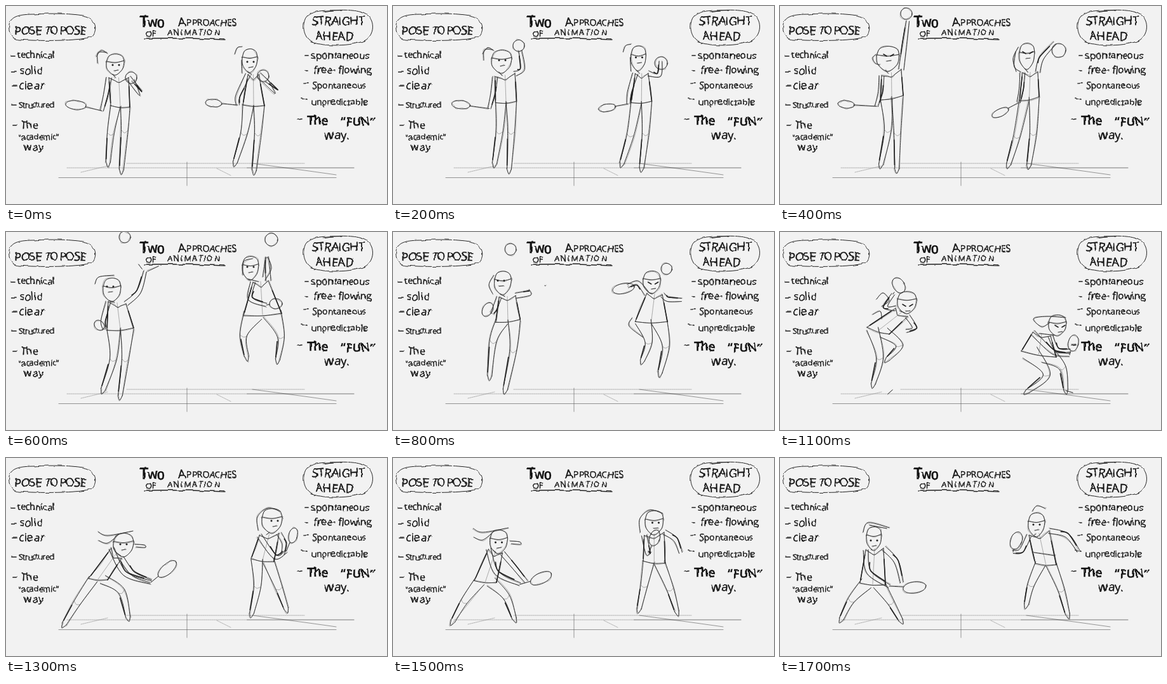
An HTML page for the animation above (1800 ms loop, 600 px wide and 312 px high).

```html
<!DOCTYPE html>
<html lang="en">
<head>
<meta charset="utf-8">
<title>Two approaches of animation</title>
<style>
  html, body { margin: 0; width: 100%; height: 100%; overflow: hidden; background: #f2f2f2; }
  svg { display: block; width: 600px; height: 312px; }
  path { fill: none; stroke: #222; stroke-linecap: round; stroke-linejoin: round; }
  text { font-family: "Open Sans", "Noto Sans", sans-serif; fill: #111; stroke: #111; stroke-width: .35; stroke-linejoin: round; }
  .strong { font-weight: 600; }
  #bold { stroke-width: 1.6; }
  #line { stroke-width: 1; stroke: #333; }
  #faint { stroke-width: .6; stroke: #777; }
</style>
</head>
<body>
<svg viewBox="0 0 600 312">
  <filter id="wobble" x="0" y="0" width="600" height="312" filterUnits="userSpaceOnUse" color-interpolation-filters="sRGB">
    <feTurbulence type="fractalNoise" baseFrequency=".07" numOctaves="2" seed="4"/>
    <feDisplacementMap in="SourceGraphic" scale="4" xChannelSelector="R" yChannelSelector="G"/>
  </filter>
  <g stroke-width=".6">
    <path style="stroke:#888" stroke-dasharray="2 1" d="M96 255H380M190 248H470M118 262L160 252M332 256L354 267"/>
    <path style="stroke:#555" d="M83 270.5H520M285 246V283M388 248L470 259L520 266"/>
    <path d="M380 255H548"/>
  </g>
  <g id="lettering" filter="url(#wobble)">
    <path d="M45 13C75 11 115 12 128 17C143 23 144 40 135 48C120 56 45 55 20 53C4 50 3 35 6 26C10 16 22 13 45 13"/>
    <path d="M530 7C500 6 482 8 474 16C466 25 466 48 482 57C500 64 545 64 566 54C580 45 581 25 570 15C560 6 530 4 500 9"/>
    <path stroke-width="1.4" d="M218 51Q280 50 344 53"/>
    <path stroke-width="1.7" d="M8 78h7M9 103h7M9 126h7M9 156h7M12 188h5M471 78h5M471 102h5M470 122h6M464 145l10 2M460 178l6-1"/>
    <text x="13" y="45" font-size="18.5" letter-spacing="-1">POSE</text>
    <text x="61" y="44" font-size="17" letter-spacing="-1">TO</text>
    <text x="84" y="45" font-size="18" letter-spacing="-1">POSE</text>
    <text x="210" y="33" font-size="25" class="strong">T</text>
    <text x="223" y="33" font-size="20" letter-spacing="-1.5" class="strong">wo</text>
    <text x="271" y="33" font-size="20">A</text>
    <text x="284" y="31" font-size="14">PPROACHES</text>
    <text x="220" y="48" font-size="12.5">OF</text>
    <text x="254" y="46" font-size="12.5" letter-spacing="1.8">ANIMATION</text>
    <text x="481" y="30" font-size="19" letter-spacing="-.6">STRAIGHT</text>
    <text x="487" y="54" font-size="18.5">AHEAD</text>
    <text x="18" y="82" font-size="14.5" letter-spacing="-.2">technical</text>
    <text x="22" y="107" font-size="16">solid</text>
    <text x="20" y="131" font-size="17" letter-spacing=".6">clear</text>
    <text x="20" y="160" font-size="12" letter-spacing="-.4">Structured</text>
    <text x="23" y="193" font-size="16">The</text>
    <text x="20" y="211" font-size="12.5">“academic”</text>
    <text x="29" y="228" font-size="15" letter-spacing="1">way</text>
    <text x="481" y="83" font-size="15">spontaneous</text>
    <text x="485" y="106" font-size="15.6">free- flowing</text>
    <text x="482" y="130" font-size="14">Spontaneous</text>
    <text x="481" y="156" font-size="13.7">unpredictable</text>
    <text x="474" y="187" font-size="20" letter-spacing="-1.2" class="strong">The</text>
    <text x="528" y="189" font-size="19" letter-spacing="-.3" class="strong">“FUN”</text>
    <text x="502" y="210" font-size="19">way.</text>
  </g>
  <path id="faint"/><path id="line"/><path id="bold"/>
</svg>
<script>
const PERIOD = 1800, STEP = 100;
const left = [], right = [];

// head: x y rx ry, face offset. torso: shoulders, then hips right and left.
// Limbs: middle joint and end. racket: x y rx ry angle. ball: x y r.
const pose = (figure, time, parts) => figure.push({ time, ...parts });

pose(left, 0, {
  head: [172, 93, 14, 16, 1, 0], torso: [162, 113, 193, 113, 195, 159, 165, 157],
  armA: [157, 140, 151, 165], armB: [212, 138, 200, 117], legA: [165, 200, 161, 246], legB: [187, 195, 182, 258],
  racket: [110, 156, 16, 7, 5], ball: [197, 113, 9], marks: ["144 90 145 74 158 73", "142 80 150 70 160 75"]
});
pose(left, 400, {
  head: [170, 84, 18, 19, 1, -6], torso: [160, 110, 191, 100, 194, 141, 158, 148], angry: true,
  armA: [158, 135, 152, 158], armB: [196, 60, 201, 24], legA: [170, 195, 159, 249], legB: [185, 200, 184, 256],
  racket: [104, 155, 13, 6, 5], ball: [199, 12, 9], marks: ["151 76 146 82 150 90 157 93"]
});
pose(left, 600, {
  head: [167, 92, 14, 18, -3, -6], torso: [161, 110, 189, 113, 201, 151, 159, 155],
  armA: [153, 140, 155, 153], armB: [209, 94, 219, 62], legA: [169, 200, 153, 248], legB: [188, 200, 180, 257],
  racket: [147, 147, 9, 7, 45], ball: [187, 8, 9], marks: ["140 82 146 71 170 68", "214 58 209 51", "223 62 240 54"]
});
pose(left, 900, {
  head: [176, 76, 13, 18, -3, -4], torso: [170, 99, 195, 94, 200, 131, 163, 136],
  armA: [163, 113, 156, 116], armB: [219, 97, 209, 107], legA: [152, 157, 152, 216], legB: [190, 178, 175, 244],
  racket: [150, 110, 7, 14, 20], ball: [184, 37, 9], marks: ["162 63 154 78 160 92", "242 79 243 79"]
});
pose(left, 1100, {
  head: [200, 112, 15, 17, 1, 4], torso: [182, 120, 201, 133, 172, 161, 137, 150], angry: true,
  armA: [166, 118, 178, 98], armB: [212, 151, 199, 156], legA: [157, 198, 147, 239], legB: [188, 179, 170, 200],
  racket: [187, 84, 9, 13, -30], marks: ["152 106 162 96 172 108 160 117", "146 130 158 125 160 137", "170 255 177 249"]
});
pose(left, 1300, {
  head: [185, 138, 16, 18, 0, -2], torso: [166, 142, 182, 158, 160, 192, 130, 190],
  armA: [187, 182, 228, 196], armB: [200, 182, 228, 194], legA: [112, 228, 92, 261], legB: [182, 210, 192, 250],
  racket: [254, 175, 18, 8, -42], marks: ["145 116 160 122 200 115", "146 130 160 134 178 120", "203 136 218 137 219 141 205 140"]
});
pose(left, 1700, {
  head: [148, 128, 12, 18, 0, 2], torso: [135, 145, 163, 142, 166, 200, 126, 197],
  armA: [140, 180, 172, 202], armB: [183, 163, 192, 196], legA: [112, 224, 97, 253], legB: [175, 228, 190, 255],
  racket: [212, 204, 18, 9, -8], marks: ["131 117 139 102 172 110", "141 106 168 111"]
});

pose(right, 0, {
  head: [384, 87, 12, 18, 1, 1], torso: [381, 108, 398, 108, 407, 157, 373, 156],
  armA: [365, 142, 365, 156], armB: [426, 135, 410, 117], legA: [375, 200, 361, 246], legB: [397, 200, 391, 259],
  racket: [327, 153, 13, 6, 5], ball: [405, 110, 9], marks: ["360 76 364 66 372 64", "371 85 372 106"]
});
pose(right, 400, {
  head: [389, 80, 12, 20, 1, -6], torso: [382, 105, 406, 104, 408, 143, 377, 149], angry: true,
  armA: [380, 130, 376, 152], armB: [412, 82, 433, 58], legA: [373, 205, 360, 249], legB: [399, 200, 392, 250],
  racket: [347, 168, 14, 6, -25], ball: [439, 70, 11], marks: ["375 65 367 83 372 103", "371 72 369 95 379 104"]
});
pose(right, 600, {
  head: [385, 58, 13, 18, 0, -3], torso: [389, 79, 413, 77, 434, 128, 374, 132],
  armA: [385, 105, 410, 115], armB: [412, 56, 411, 39], legA: [374, 163, 379, 196], legB: [433, 165, 428, 201],
  racket: [425, 113, 10, 8, 0], ball: [418, 12, 10], marks: ["373 68 374 47 388 42", "404 71 410 40 418 57 408 76"]
});
pose(right, 900, {
  head: [419, 91, 14, 17, 3, 3], torso: [405, 106, 430, 110, 431, 148, 385, 146], angry: true,
  armA: [385, 68, 350, 70], armB: [443, 131, 476, 141], legA: [417, 180, 400, 205], legB: [428, 187, 417, 232],
  racket: [332, 77, 21, 8, -18], ball: [437, 81, 8], marks: ["388 146 383 159 405 177"]
});
pose(right, 1100, {
  head: [437, 148, 14, 16, 4, 1], torso: [398, 158, 426, 164, 435, 197, 380, 188], angry: true,
  armA: [430, 189, 456, 194], armB: [437, 186, 457, 187], legA: [420, 225, 390, 251], legB: [445, 214, 450, 248],
  racket: [462, 175, 8, 13, 10], marks: ["425 143 412 149 399 137 420 133 450 135", "459 177 466 177", "450 250 461 253"]
});
pose(right, 1300, {
  head: [419, 100, 16, 19, 4, -1], torso: [399, 122, 430, 119, 422, 163, 386, 159],
  armA: [424, 156, 441, 147], armB: [438, 135, 436, 152], legA: [396, 202, 387, 244], legB: [430, 205, 441, 237],
  racket: [452, 122, 7, 12, 15], marks: ["397 114 396 93 412 79 432 84"]
});
pose(right, 1700, {
  head: [404, 106, 13, 18, 0, -1], torso: [392, 122, 424, 115, 435, 168, 402, 166],
  armA: [380, 146, 367, 148], armB: [452, 122, 470, 147], legA: [395, 200, 388, 230], legB: [443, 208, 453, 246],
  racket: [372, 130, 9, 14, 20], marks: ["397 84 405 75 418 80", "400 149 433 154"]
});

const mix = (a, b, k) => a + (b - a) * k;
const between = (a, b, k) => [mix(a[0], b[0], k), mix(a[1], b[1], k)];
const pairs = n => n.reduce((list, x, i) => (i % 2 || list.push([x, n[i + 1]]), list), []);
const ink = {};

function curve(p) {
  let d = "M" + p[0];
  for (let i = 0; i < p.length - 1; i++) {
    const b = p[i], c = p[i + 1], a = p[i - 1] || b, e = p[i + 2] || c;
    d += "C" + [0, 1].map(k => b[k] + (c[k] - a[k]) / 6) + " " + [0, 1].map(k => c[k] - (e[k] - b[k]) / 6) + " " + c;
  }
  return d;
}

const loosen = ([x, y], i) => [x + 1.4 * Math.sin(i * 5 + y), y + 1.4 * Math.cos(i * 3 + x)];
const faint = (...points) => ink.faint += curve(points);
const bold = (...points) => ink.bold += curve(points);
function line(...points) {
  ink.line += curve(points);
  faint(...points.map(loosen));
}

function ellipse(x, y, rx, ry = rx, degrees = 0) {
  const a = degrees * Math.PI / 180;
  return Array.from({ length: 14 }, (_, i) => {
    const u = rx * Math.cos(i / 2), v = ry * Math.sin(i / 2);
    return [x + u * Math.cos(a) - v * Math.sin(a), y + u * Math.sin(a) + v * Math.cos(a)];
  });
}

// The two outlines of a limb, offset from its joints.
function sides(joints, widths) {
  const side = sign => joints.map(([x, y], i) => {
    const [ax, ay] = joints[i - 1] || joints[i], [bx, by] = joints[i + 1] || joints[i];
    const reach = sign * widths[i] / (Math.hypot(bx - ax, by - ay) || 1);
    return [x - (by - ay) * reach, y + (bx - ax) * reach];
  });
  return [side(1), side(-1)];
}

function arm(shoulder, numbers) {
  const [a, b] = sides([shoulder, ...pairs(numbers)], [4, 3.5, 2.5]);
  line(...a);
  line(...b);
  bold(between(b[0], b[1], .6), b[1], between(b[1], b[2], .7));
}

function leg(hip, width, numbers) {
  const [knee, foot] = pairs(numbers);
  const [a, b] = sides([hip, knee, foot], [width, 5.5, 3.5]);
  const length = Math.hypot(foot[0] - knee[0], foot[1] - knee[1]);
  line(...a);
  line(...b);
  line(a[2], between(knee, foot, 1 + 8 / length), b[2]);
  bold(between(a[1], a[2], .2), between(a[1], a[2], .9));
  faint(a[1], between(knee, foot, .08), b[1]);
}

function head([x, y, rx, ry, fx, fy], angry) {
  const at = (u, v) => [x + u * rx, y + v * ry];
  const face = (u, v) => [x + fx + u, y + fy + v];
  line(at(-1, -.3), at(-.9, .4), at(-.05, 1), at(.78, .45), at(1, -.3));
  line(at(-1, -.3), at(-.7, -.9), at(.1, -1.08), at(.8, -.85), at(1, -.3));
  line(at(-1, -.38), at(0, -.25), at(1, -.42));
  for (const s of [-1, 1]) {
    if (angry) bold(face(s * 8, -2), face(s * 3, 1));
    else bold(...ellipse(...face(s * 5, 0), .7));
  }
  line(face(-3, 9), face(4, 8));
}

function body(p) {
  const [shoulderA, shoulderB, hipB, hipA] = pairs(p.torso);
  const neck = between(shoulderA, shoulderB, .5);
  const [x, y, , ry] = p.head, [rx, rh] = p.racket;
  const hand = p.armA.slice(2);
  const scoop = between(neck, between(hipA, hipB, .5), .17);
  const width = Math.hypot(hipA[0] - hipB[0], hipA[1] - hipB[1]) / 4;
  const k = Math.max(0, 1 - Math.max(p.racket[2], p.racket[3]) / Math.hypot(rx - hand[0], rh - hand[1]));

  head(p.head, p.angry);
  line([x - 4, y + ry * .9], between(shoulderA, neck, .7));
  line(shoulderA, between(shoulderA, scoop, .6), scoop, between(shoulderB, scoop, .6), shoulderB);
  line(shoulderA, between(shoulderA, hipA, .5), hipA);
  line(shoulderB, between(shoulderB, hipB, .5), hipB);
  bold(between(shoulderA, hipA, .15), between(shoulderA, hipA, .9));
  bold(between(shoulderB, hipB, .3), hipB);
  line(hipA, between(hipA, hipB, .5).map((v, i) => v + i * 2), hipB);
  faint(neck, between(hipA, hipB, .5));
  arm(shoulderA, p.armA);
  arm(shoulderB, p.armB);
  leg(between(hipA, hipB, .25), width, p.legA);
  leg(between(hipA, hipB, .75), width, p.legB);
  line(...ellipse(...p.racket));
  line(hand, between(hand, [rx, rh], k));
  if (p.ball) line(...ellipse(...p.ball));
  for (const mark of p.marks) {
    line(...pairs(mark.split(" ").map(Number)).map(([u, v]) => [u + p.shift[0], v + p.shift[1]]));
  }
}

function poseAt(figure, time) {
  const i = figure.findLastIndex(p => p.time <= time);
  const a = figure[i], b = figure[i + 1] || a;
  const k = a === b ? 0 : (time - a.time) / (b.time - a.time);
  const near = k > .5 ? b : a, result = { ...near };
  for (const part in near) {
    if (typeof near[part][0] === "number" && a[part] && b[part]) {
      result[part] = a[part].map((v, n) => mix(v, b[part][n], k));
    }
  }
  result.shift = [0, 1].map(n => result.head[n] - near.head[n]);
  return result;
}

function draw(time) {
  ink.faint = ink.line = ink.bold = "";
  for (const figure of [left, right]) body(poseAt(figure, time));
  for (const id in ink) document.getElementById(id).setAttribute("d", ink[id]);
}

// Uneven letter angles, like handwriting.
document.querySelectorAll("text").forEach((text, n) => {
  const tilt = [...text.textContent].map((_, i) => (5 * Math.sin(i * 2.3 + n)).toFixed(1));
  text.setAttribute("rotate", tilt.join(" "));
});

const start = performance.now();
let shown = -1;
function tick() {
  const time = Math.floor((performance.now() - start) % PERIOD / STEP) * STEP;
  if (time !== shown) draw(shown = time);
  requestAnimationFrame(tick);
}
tick();
</script>
</body>
</html>
```
